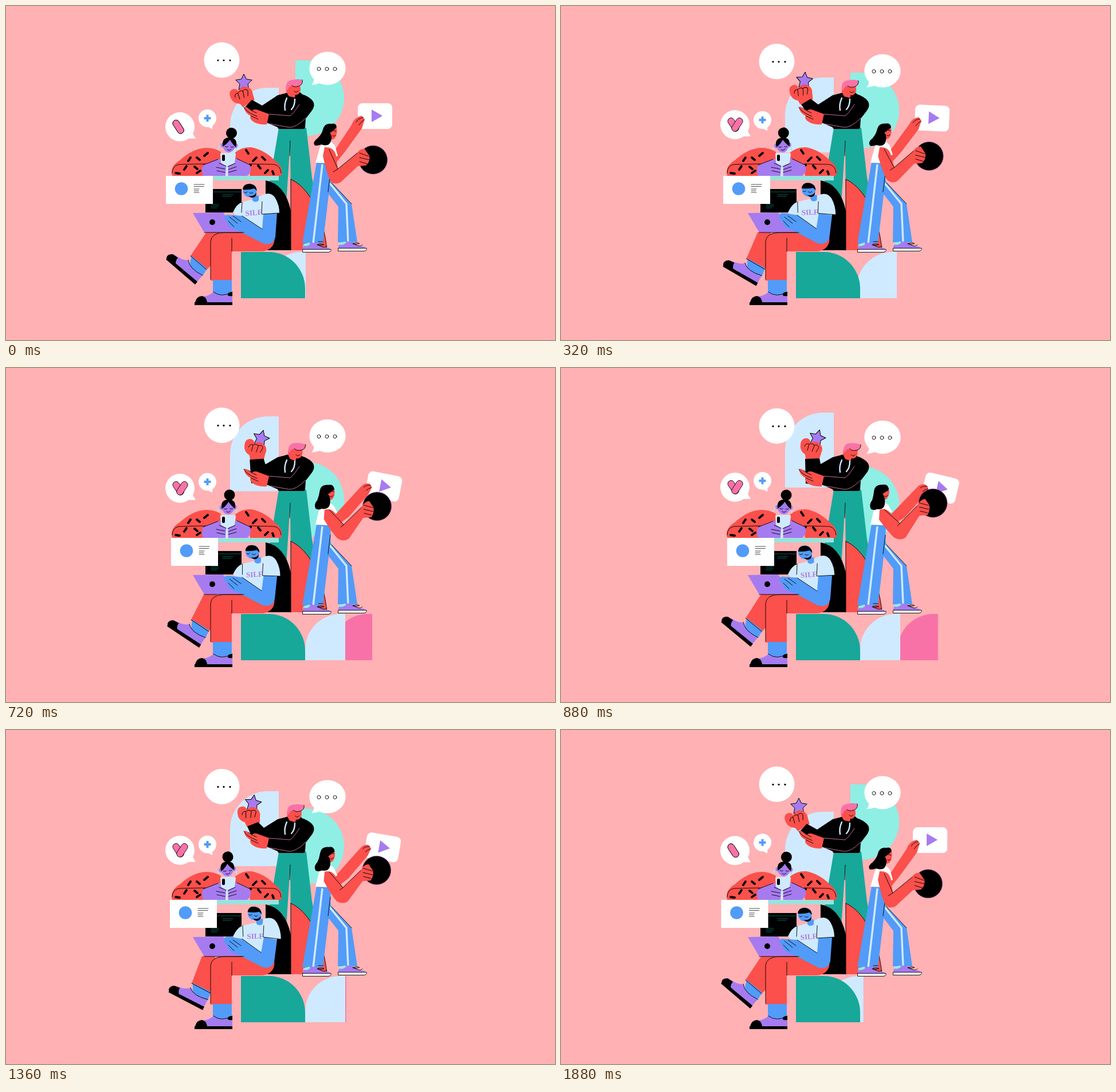
Animation of 958x584 px, one loop 1.92 s. Source, as an HTML page:

```html
<!DOCTYPE html>
<html lang="en">
<head>
<meta charset="utf-8">
<title>Creative people</title>
<style>
html, body { margin: 0; width: 100%; height: 100%; overflow: hidden; background: #ffb1b4; }
svg { display: block; width: 100%; height: 100%; }
.red { fill: #fb504b; } .purple { fill: #a67bf0; } .blue { fill: #529bf8; }
.green { fill: #17a89a; } .pale { fill: #cfeafe; } .mint { fill: #8fefe5; }
.pink { fill: #f872a7; } .white { fill: #fff; }
.ink { fill: none; stroke: #000; stroke-width: .9; stroke-linecap: round; stroke-linejoin: round; }
.stripe { fill: none; stroke: #cfeafe; stroke-width: 3.4; }
.seeds { fill: none; stroke: #000; stroke-width: 3.8; stroke-linecap: round; }
</style>
</head>
<body>
<svg viewBox="0 0 958 584">
  <defs>
    <path id="arch" d="M0 511V492A62 62 0 0 1 62 430H70V511Z"/>
    <rect id="pill" x="-5.7" y="-13" width="11.4" height="26" rx="5.7" stroke="#000" stroke-width=".8"/>
    <g id="shoe">
      <path class="mint" d="M1 3L12 0L14 9L0 9Z"/>
      <path class="purple" d="M0 11Q0 5 4 6Q10 7 16 0L26 2Q33 10 43 9Q49 11 49 14L0 15Z"/>
      <path class="white" d="M0 12L49 12Q50 16 45 17H0Z"/>
      <path class="ink" d="M0 12H49Q50 16 45 17H0ZM25 4Q33 1 37 4Q31 6 25 4L35 8Q40 9 42 6"/>
    </g>
  </defs>

  <path id="backPale" class="pale" d="M391 274V209A66 66 0 0 1 457 143H476V274Z"/>
  <path id="backMint" class="mint" d="M505 95H524A66 66 0 0 1 524 227H505Z"/>
  <use id="pinkArch" href="#arch" class="pink"/>
  <use id="paleArch" href="#arch" class="pale"/>
  <path class="green" d="M410 430H458A64 64 0 0 1 522 494V511H410Z"/>

  <g id="standingMan">
    <path class="green" d="M476 213H500L496 238L489 346H453L464 285Z"/>
    <path class="green" d="M495 213H524L534 300L546 360H497L496 238Z"/>
    <path class="ink" d="M496 236L495 262"/>
    <path d="M453 305Q487 311 497 358V427H453Z"/>
    <path class="red" d="M497 303C531 318 555 370 560 427H497Z"/>
    <path class="ink" d="M497 303V427M497 303C531 318 555 370 560 427"/>
    <g id="star">
      <path class="purple" stroke="#000" stroke-width="1" stroke-linejoin="round"/>
    </g>
    <g id="starHand">
      <path class="red" d="M-11 18L-12 10Q-22 4 -20 -8Q-18 -20 -8 -18Q-2 -16 -3 -10Q7 -15 13 -9Q21 -2 16 8L13 18Z"/>
      <path class="ink" d="M-13 -4Q-11 -10 -5 -8L-8 3M-4 -8Q3 -10 4 -5L0 5M4 -6Q11 -8 12 -2L7 6"/>
    </g>
    <path id="starSleeve"/>
    <path d="M474 156L490 152L513 153Q530 158 536 167Q540 175 533 184L523 197L522 212Q522 215 518 215H478Q474 215 474 212L455 204L459 188L470 180Z"/>
    <path class="ink" style="stroke:#d77aa5" d="M459 189L495 192Q499 192 512 172M460 206L493 212Q505 214 523 196"/>
    <path class="red" d="M415 177Q419 175 423 179L429 183Q434 179 440 182L459 189L455 207Q438 208 430 201Q424 196 427 192Q417 188 415 177Z"/>
    <path class="ink" d="M415 177Q419 184 427 188L438 193M423 179Q429 184 437 187M427 192L440 198"/>
    <path d="M488 152Q497 151 501 151Q513 148 517 155L515 165H488Z"/>
    <g id="manHead">
      <path class="red" d="M489 140L512 136Q517 149 510 154Q507 156 505 155L504 160L494 158Q487 150 489 140Z"/>
      <path class="pink" d="M489 147Q486 130 501 129Q508 127 517 129Q519 137 511 140Q503 143 499 139Q493 140 492 147Z"/>
      <path class="ink" d="M499 139Q503 143 511 140Q519 137 517 129M503 149Q507 153 510 148"/>
    </g>
    <path class="ink" style="stroke:#cfeafe;stroke-width:2.4" d="M490 161Q485 172 487 182M504 163Q504 175 498 181"/>
  </g>

  <g id="phoneWoman">
    <rect x="362" y="297" width="114" height="8" fill="#9be2dc"/>
    <path class="ink" style="stroke:#b8dcea;stroke-width:2" d="M377 239L368 253M399 240L403 254"/>
    <path class="red" d="M290 297Q286 280 303 270Q326 249 349 248Q364 248 375 255L375 271L348 280L346 297Z"/>
    <path class="red" d="M400 256Q412 246 428 247Q452 252 469 270Q486 283 480 297H426L424 276L400 270Z"/>
    <path class="ink" d="M290 292Q290 279 302 277L348 276M424 276L468 277Q479 279 480 292"/>
    <path class="seeds" d="M318 271l4-6M333 265l5 4M346 262l6-5M311 286l4-6M329 281l5 4M296 292l7 1M333 292l6-4M419 252l4 6M431 271l6-6M447 264l5 5M421 283l6-5M440 279l4 5M452 292l5-5M465 289l2 5"/>
    <g id="phoneHead">
      <path class="purple" d="M378 240Q388 228 399 240Q404 239 403 245Q402 248 398 248Q394 256 388 256Q380 255 378 248Q373 248 373 243Q374 239 378 240Z"/>
      <circle cx="391" cy="222" r="9.5"/>
      <path d="M377 246Q374 230 389 230Q403 230 400 246Q395 243 389 234Q383 243 377 246Z"/>
      <path class="ink" d="M381 246Q383 248 386 246M391 246Q394 248 396 246M385 251Q389 254 392 250"/>
    </g>
    <path class="purple" d="M344 278L370 268Q376 266 378 274L386 280L383 297H344Q340 288 344 278Z"/>
    <path class="purple" d="M426 278L403 267Q398 266 398 274L387 280L388 297H421Q430 290 426 278Z"/>
    <path class="pale" d="M374 259Q374 257 377 257H398Q401 257 401 259L399 275L388 279L387 298H383L384 280L375 274Z"/>
    <rect x="377" y="260" width="5" height="11" rx="2"/>
    <path class="ink" d="M372 275L384 280M367 282L382 285M368 288L382 291M400 275L387 281M402 281L388 286M402 287L388 291M344 278L370 268M426 278L403 267"/>
  </g>

  <g id="cards">
    <rect x="348" y="320" width="63" height="41"/>
    <path class="ink" style="stroke:#128579;stroke-width:.7" d="M349 325H410M378 330H396M378 333H393M358 347H371M358 350H371M358 353H368"/>
    <g id="whiteCard">
      <rect class="white" x="279" y="297" width="82" height="49"/>
      <circle class="blue" cx="306" cy="319.5" r="11.3"/>
      <path class="ink" style="stroke-width:.7" d="M328 312H346M328 315.5H345M328 320H337M328 323H336M328 326H337"/>
    </g>
  </g>

  <g id="laptopMan">
    <g id="swingFoot">
      <path class="red" d="M350 395L322 437L350 461L372 440L372 395Z"/>
      <path class="blue" d="M324 437L351 459L343 472L318 461Z"/>
      <path class="purple" d="M292 434Q309 446 318 444Q319 459 343 471L331 485L282 443Z"/>
      <path d="M280 441Q281 433 291 434L300 440Q294 446 297 457Z"/>
      <path d="M279 443L283 439L334 482L330 487Z"/>
      <path class="ink" d="M322 437L350 461M318 444Q319 459 343 471"/>
    </g>
    <path class="red" d="M357 480V412Q358 397 380 396H466Q472 412 463 422Q456 430 440 429H394V480Z"/>
    <path class="ink" d="M357 478V412Q358 397 380 396H412M394 406V429"/>
    <path class="blue" d="M361 479H394V506H361Z"/>
    <path class="purple" d="M342 508Q355 507 362 500Q376 511 395 500V519H335Z"/>
    <path d="M330 520Q331 508 342 507Q351 509 351 520ZM329 518H395V523H329ZM395 500Q386 500 387 506Q390 508 395 507Z"/>
    <path class="ink" d="M362 500Q376 511 395 500"/>
    <path id="shirt" class="pale"/>
    <g id="shirtPrint"><text x="418" y="367" font-family="'Liberation Serif', serif" font-weight="bold" font-size="13" fill="#b07bdc" transform="rotate(-5 418 367)">SILFOM</text></g>
    <path id="sleeve" class="pale"/>
    <path class="purple" d="M326 362L379 361L397 388L415 395L346 396Z"/>
    <circle cx="360" cy="378" r="5"/>
    <path id="typingArm" class="blue"/>
    <path id="shirtLines" class="ink"/>
    <path class="ink" d="M390 369L404 380M396 367L410 377M388 376L398 386M346 396H415"/>
    <g id="typingHead">
      <path class="blue" d="M429 328L441 332L441 340Q435 345 430 340Z"/>
      <circle class="blue" cx="425.5" cy="322.5" r="12"/>
      <path d="M413 321Q414 310 426 311Q436 312 438 323L433 319Q424 322 413 321ZM423 332Q433 334 437 326Q437 336 428 335Z"/>
      <path class="ink" d="M416 326Q419 328 421 325M425 326Q428 329 431 326"/>
    </g>
  </g>

  <g id="walkingWoman">
    <path class="blue" d="M563 290L568 309L603 346L613 413H579L580 351L560 325Z"/>
    <path class="stripe" d="M565 310L594 346L597 413"/>
    <path class="blue" d="M542 273H567L566 305L553 415H517Z"/>
    <path class="stripe" d="M552 277L536 415"/>
    <path class="ink" d="M566 292L562 325M545 412H553M568 309L603 346"/>
    <use href="#shoe" x="518" y="413.5"/>
    <use href="#shoe" x="580" y="411.5"/>
    <g id="playCard">
      <rect class="white" x="-30" y="-22.5" width="60" height="45" rx="8"/>
      <path class="purple" d="M-6 -11.5L13 -.5L-6 10.5Z"/>
    </g>
    <path id="backArm" class="red"/>
    <path id="backFingers" class="ink"/>
    <path id="womanFace" class="red"/>
    <path id="womanSmile" class="ink"/>
    <path id="womanShirt" class="white"/>
    <path id="hair"/>
    <circle id="ball" r="25" stroke="#a0509a" stroke-width=".8"/>
    <path id="frontArm" class="red"/>
    <path id="frontLines" class="ink"/>
  </g>

  <g id="dotBubble">
    <circle class="white" cx="376.5" cy="94.5" r="31"/>
    <circle cx="370" cy="95" r="1.6"/><circle cx="380" cy="95" r="1.6"/><circle cx="391" cy="95" r="1.6"/>
  </g>
  <g id="ringBubble">
    <ellipse class="white" cx="561" cy="109" rx="31.7" ry="29"/>
    <path class="white" d="M538 126Q537 134 533 138Q543 137 551 134Z"/>
    <g class="ink"><circle cx="546" cy="110" r="3"/><circle cx="560" cy="110" r="3"/><circle cx="574" cy="110" r="3"/></g>
  </g>
  <g id="heartBubble">
    <circle class="white" r="25.5"/>
    <path class="white" d="M22 11L27.5 20.5L12 20.5Z"/>
    <use href="#pill" class="pink" transform="translate(-2.8) rotate(-33)"/>
    <use id="heartPill" href="#pill" class="pink"/>
  </g>
  <g id="plusBubble">
    <circle class="white" r="15.5"/>
    <path class="white" d="M-1 14L8.5 19L9 11Z"/>
    <path class="blue" d="M-2 -6H2V-2H6V2H2V6H-2V2H-6V-2H-2Z"/>
  </g>
</svg>
<script>
const LOOP = 1920, STEP = 40;
const $ = id => document.getElementById(id);
const lerp = (a, b, p) => a + (b - a) * p;
const smooth = x => (1 - Math.cos(Math.PI * x)) / 2;
const set = (id, name, value) => $(id).setAttribute(name, value);
const place = (id, x, y, turn = 0, cx = 0, cy = 0) =>
  set(id, "transform", `translate(${x} ${y}) rotate(${turn} ${cx} ${cy})`);

// Piecewise linear value through [time, value] pairs.
function track(t, ...keys) {
  if (t <= keys[0][0]) return keys[0][1];
  for (let i = 1; i < keys.length; i++) {
    const [t0, a] = keys[i - 1], [t1, b] = keys[i];
    if (t < t1) return lerp(a, b, (t - t0) / (t1 - t0));
  }
  return keys[keys.length - 1][1];
}
const swell = (t, start, peak, end) => smooth(track(t, [start, 0], [peak, 1], [end, 0]));

// Blends two paths that have the same commands.
function mix(a, b, p) {
  const ends = b.match(/-?[\d.]+/g);
  let i = 0;
  return a.replace(/-?[\d.]+/g, n => lerp(+n, +ends[i++], p).toFixed(2));
}

const poses = {
  star: {
    starSleeve: [
      "M416 178L429 164L447 174L474 156L478 200L455 199L440 192Z",
      "M426 159L451 158L453 168L474 156L478 200L450 204L427 202Z"]
  },
  sit: {
    shirt: [
      "M396 361Q402 346 412 343L430 338L447 331L462 335L472 365L448 392L410 374Z",
      "M396 361Q403 346 413 342L436 337L449 331L464 335L474 365L446 390L410 374Z"],
    sleeve: [
      "M446 364L446 331Q462 323 470 336Q477 348 477 362Z",
      "M449 362L449 331Q465 324 473 337Q480 350 480 366Z"],
    typingArm: [
      "M449 364L473 362L470 404Q466 420 448 415L402 391Q388 388 387 378Q376 368 386 365Q394 366 400 366L412 367L447 390Z",
      "M450 362L473 367L468 404Q463 420 446 414L402 391Q388 388 387 378Q375 365 385 361Q394 360 400 363L412 365L445 389Z"],
    shirtLines: [
      "M412 343L411 361M447 342L446 364L477 362M412 367L447 390",
      "M413 342L414 361M450 342L449 362L480 366M412 365L445 389"]
  },
  reach: {
    backArm: [
      "M574 252L603 208Q608 194 621 192L626 198L621 214L592 254L576 274Z",
      "M574 258L625 206Q631 202 638 205L642 211L636 222L600 262L580 274Z"],
    backFingers: [
      "M611 203Q615 196 623 195M616 208Q620 202 625 199",
      "M628 210Q632 206 640 208M632 216Q636 212 641 212"],
    womanFace: [
      "M560 212Q572 204 577 213Q579 224 574 231Q570 235 566 233L566 246L555 246Z",
      "M552 212Q566 202 572 212Q574 222 568 229Q564 231 561 229L561 248L552 248Z"],
    womanSmile: ["M570 227Q573 229 575 226M572 218L576 219", "M564 224Q567 226 570 222M567 214L571 215"],
    womanShirt: [
      "M548 246Q557 236 567 237L574 244L579 262L573 264L567 275L540 274Z",
      "M546 247Q556 236 564 235L571 239L578 251L570 254L567 275L540 274Z"],
    hair: [
      "M577 212Q576 204 568 206Q556 204 553 216Q551 224 544 231Q534 238 539 244Q546 244 550 242Q564 247 567 236Q570 226 565 222Q572 218 577 212Z",
      "M572 212Q570 202 561 204Q548 203 546 214Q545 224 543 231Q537 239 541 247Q547 250 551 247Q563 249 565 238Q566 226 561 220Q568 216 572 212Z"],
    frontArm: [
      "M556 247Q573 246 576 262L579 285L613 257Q617 249 626 250L634 262Q636 272 628 279L614 280L584 308Q574 314 566 306Q560 295 553 262Z",
      "M556 248Q566 244 574 252L592 271L622 240Q628 228 636 228L643 238Q645 248 640 256L626 257L602 296Q593 302 582 296Q570 285 555 265Z"],
    frontLines: [
      "M564 251L579 285L571 290M579 285L613 257M617 257L633 263M617 265L634 269M617 272L630 276",
      "M564 247L592 271L588 275M592 271L622 240M626 235L642 239M626 242L642 246M627 249L640 252"]
  }
};
function pose(name, p) {
  for (const [id, [a, b]] of Object.entries(poses[name])) set(id, "d", mix(a, b, p));
}

const starPoints = Array.from({ length: 10 }, (_, i) => {
  const r = i % 2 ? 7.5 : 15, a = i * Math.PI / 5;
  return `${r * Math.sin(a)} ${-r * Math.cos(a)}`;
});
$("star").firstElementChild.setAttribute("d", `M${starPoints.join("L")}Z`);

function draw(t) {
  const drift = track(t, [0, 0], [LOOP / 2, 1], [LOOP, 0]);
  const slide = swell(t, 0, 905, 1880);
  const lift = swell(t, 0, 860, 1860);
  const reach = swell(t, 40, 1020, 1920);
  const half = t % 960;
  const sway = smooth(half / 480);

  place("backPale", 0, -65 * slide);
  place("backMint", 0, 77 * slide);
  // The pink arch rides behind the pale one, then slides out of it.
  const paleX = track(t, [0, 453], [350, 522], [1430, 522], [1914, 453]);
  place("paleArch", paleX, 0);
  place("pinkArch", paleX + track(t, [320, 0], [915, 70], [1370, 0]), 0);

  pose("star", lift);
  place("star", lerp(415, 447, lift), lerp(134, 122.5, lift), 17 * lift);
  place("starHand", lerp(413, 438, lift), lerp(156, 141, lift), lerp(-33, 0, lift));
  place("manHead", 2 * lift, 2 * lift, 9 * lift, 500, 156);

  place("phoneHead", 1 - 2.5 * sway, 0, 3 - 9 * sway, 388, 250);
  place("whiteCard", 12 * drift, 0);
  pose("sit", sway);
  place("swingFoot", 0, 0, -14 * sway, 349, 431);
  place("shirtPrint", 3 * sway, -sway, 4 * sway, 432, 361);
  place("typingHead", 9 * sway, -2 * sway, 5 * sway, 426, 322);

  pose("reach", reach);
  place("playCard", lerp(644, 663, reach), lerp(192.5, 211, reach), 14 * reach);
  place("ball", lerp(640.5, 649.5, reach), lerp(269, 234.5, reach));

  place("dotBubble", 0, 7.5 * drift);
  place("ringBubble", 0, 13 * drift);
  place("heartBubble", 303.5, track(t % 640, [0, 211.2], [320, 207.5], [640, 211.2]));
  place("plusBubble", 351.5, track(half, [0, 196.3], [540, 201.2], [960, 196.3]));
  const open = track(t, [0, 0], [260, 1], [1360, 1], [1690, 0]);
  place("heartPill", lerp(-2.8, 4, open), 0, lerp(-33, 33, open));
}

let begin;
function tick(now) {
  begin ??= now;
  draw(Math.floor((now - begin) % LOOP / STEP) * STEP);
  requestAnimationFrame(tick);
}
draw(0);
requestAnimationFrame(tick);
</script>
</body>
</html>
```
